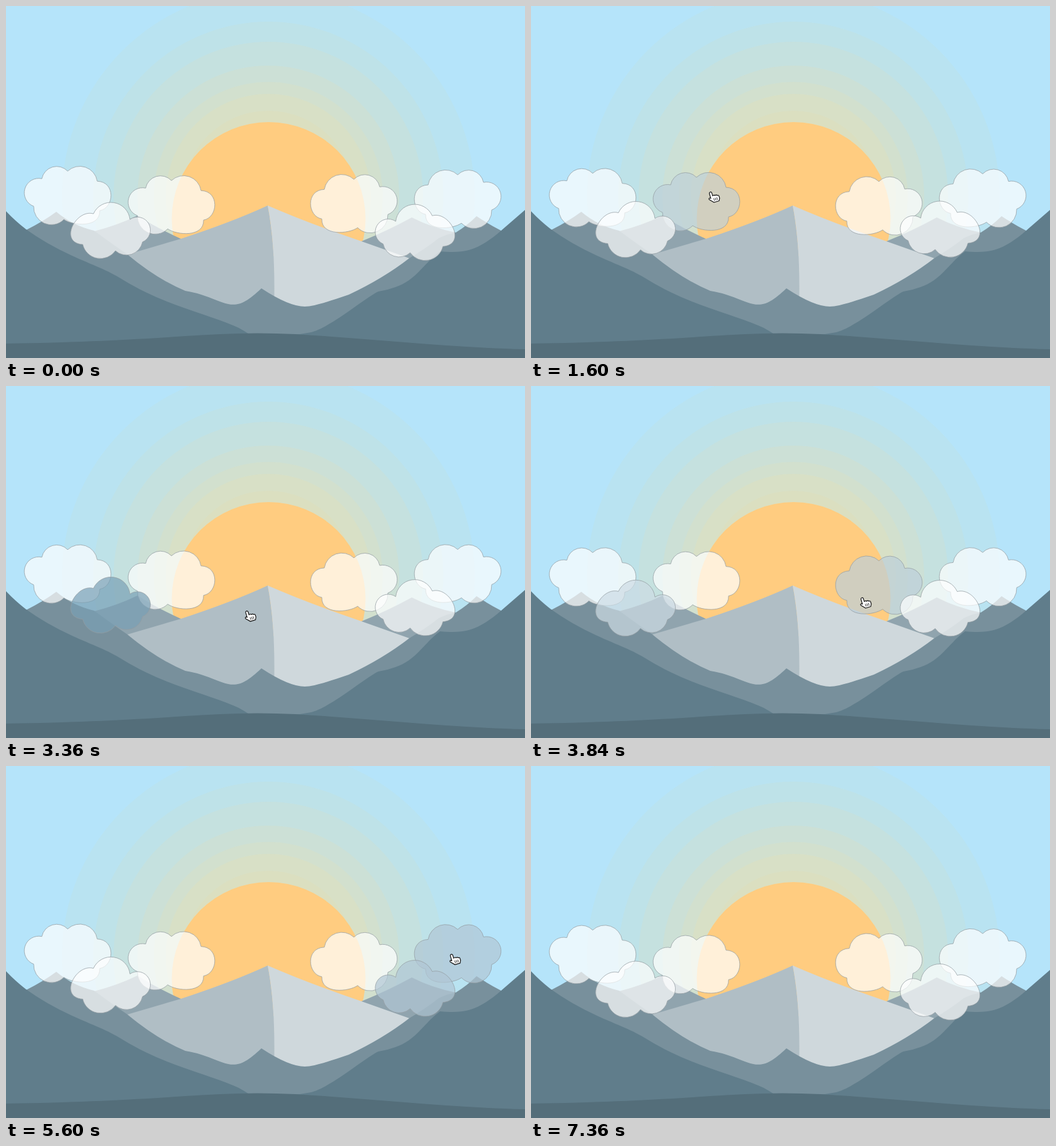
These frames come from a looping animation (825x561 px, 7.52 s). An HTML page:

```html
<!DOCTYPE html>
<html lang="en">
<head>
<meta charset="utf-8">
<title>Sunrise with clouds</title>
<style>
html, body { margin: 0; width: 100%; height: 100%; overflow: hidden; background: #b5e4fa; }
svg { display: block; }
.cloud { fill-opacity: .7; stroke: #949da2; stroke-opacity: .85; stroke-width: .9; }
</style>
</head>
<body>
<svg width="825" height="561" viewBox="0 0 825 561">
  <rect width="825" height="561" fill="#b5e4fa"/>
  <!-- stepped glow -->
  <circle cx="417" cy="303" r="328" fill="#b9e3f1"/>
  <circle cx="417" cy="303" r="278" fill="#bee2e8"/>
  <circle cx="417" cy="303" r="246" fill="#c5e1df"/>
  <circle cx="417" cy="303" r="208" fill="#cce0d6"/>
  <circle cx="417" cy="303" r="182" fill="#d2e0ce"/>
  <circle cx="417" cy="303" r="163" fill="#d8e0c6"/>
  <circle cx="417" cy="303" r="136" fill="#dbdfc0"/>
  <circle cx="417.5" cy="339" r="154" fill="#ffcc80"/>
  <!-- far range -->
  <path fill="#90a4ae" d="M140 359Q176 350 209 334Q240 354 278 371L416 400L565 375Q607 358 645 337Q676 353 715 361L641 420H193Z"/>
  <!-- main peak -->
  <path fill="#b0bec5" d="M416 318Q360 344 278 371L193 396V480H428Q428 380 416 318Z"/>
  <path fill="#cfd8dc" d="M416 318Q480 346 565 375L641 402V485H426Q429 385 416 318Z"/>
  <!-- middle range -->
  <path fill="#78909c" d="M32 357Q58 344 80 328Q106 350 140 358Q164 376 193 396Q241 436 285 454Q300 456 322 464C360 479 369 485 406 450Q450 479 475 479C490 479 512 471 545 460Q600 434 641 402Q665 388 688 370Q700 364 715 361Q733 350 748 335Q766 347 787 358V540H32Z"/>
  <!-- near slopes -->
  <path fill="#607d8b" d="M0 327Q15 343 32 356Q64 379 103 397C142 415 158 419 187 437C254 478 320 490 370 513Q379 518 385 522V561H0Z"/>
  <path fill="#607d8b" d="M825 325L787 358C748 392 726 394 690 391C664 410 652 437 619 448Q606 453 592 455C575 462 515 513 485 520Q470 523 455 524V561H825Z"/>
  <path fill="#546e7a" d="M0 538C190 535 270 526 340 523Q400 520 460 523C590 531 700 544 825 547V561H0Z"/>
  <g id="clouds"></g>
  <g id="hand" stroke="#111" stroke-linejoin="round" stroke-linecap="round">
    <g transform="rotate(-17)">
      <path fill="#fff" stroke-width="1.2" d="M-2 1.5Q-1.8-.5 0-.5Q2-.5 2 1.5V6.5Q5 5 5.5 7Q8.5 6 9 8Q11.5 7.5 11.5 10V13L9.5 17H1L-5 10.5Q-5.5 8-3 8.5L-2 9.5Z"/>
      <path fill="none" stroke-width=".8" d="M2.5 11v3.5M5 11v3.5M7.5 11v3.5"/>
    </g>
  </g>
</svg>
<script>
const LOOP = 7520, STEP = 160, BOB = 2400, FADE = 900;
const BIG = 'M29 19A23 23 0 0 0 16 63A28 28 0 0 0 64 84C78 94 122 98 121 70C144 66 147 24 117 23A28 28 0 0 0 70 7A24 24 0 0 0 29 19Z';
const SMALL = 'M36 18C8 10 -20 64 19 67A29 29 0 0 0 71 77A26 26 0 0 0 114 63A20.7 20.7 0 1 0 94 27A30.4 30.4 0 0 0 36 18Z';

// a and b: cosine and sine parts of the bobbing; over: time span of the pointer on the cloud
const clouds = [
  { d: BIG, x: 28, y: 256.2, a: 0, b: -4 },
  { d: BIG, x: 193, y: 267.3, a: 3.9, b: -.8, over: [1230, 2280] },
  { d: BIG, x: 623, y: 269.3, a: 0, b: -4, flip: true, over: [3460, 4240] },
  { d: BIG, x: 788, y: 258.7, a: 3.4, b: -4.1, flip: true, over: [5150, 6420] },
  { d: SMALL, x: 103, y: 309.7, a: 3.4, b: -4.1, over: [2280, 3220] },
  { d: SMALL, x: 713.5, y: 312.3, a: 3.9, b: -.8, flip: true, over: [4180, 5150] }
];

// pointer path: time, x, y
const path = [
  [480, 300, 9], [1120, 294, 209], [1280, 290, 270], [1600, 285, 297],
  [2280, 222, 345], [2720, 173, 358], [3220, 232, 372], [3460, 490, 350],
  [3840, 526, 338], [4220, 605, 345], [4800, 661, 356], [5150, 690, 330],
  [5500, 712, 305], [6240, 681, 273], [6420, 684, 250], [6720, 690, 33], [6880, 690, 0]
];

const hand = document.getElementById('hand');
const group = document.getElementById('clouds');
for (const c of clouds) {
  c.el = document.createElementNS('http://www.w3.org/2000/svg', 'path');
  c.el.setAttribute('d', c.d);
  c.el.setAttribute('class', 'cloud');
  group.append(c.el);
}

const clamp = v => Math.max(0, Math.min(1, v));
const mix = (a, b, k) => a + (b - a) * k;

function shade(t, over) {
  if (!over) return 0;
  const [enter, leave] = over;
  const peak = clamp((Math.min(t, leave) - enter) / FADE);
  return clamp(peak - Math.max(0, t - leave) / FADE);
}

function drawHand(t) {
  const i = path.findIndex((p, n) => n && t <= p[0]);
  const shown = i > 0 && t >= path[0][0];
  hand.setAttribute('visibility', shown ? 'visible' : 'hidden');
  if (!shown) return;
  const [t0, x0, y0] = path[i - 1], [t1, x1, y1] = path[i];
  const k = (t - t0) / (t1 - t0);
  hand.setAttribute('transform', `translate(${mix(x0, x1, k)} ${mix(y0, y1, k)})`);
}

function draw(now) {
  const t = Math.floor(now % LOOP / STEP) * STEP;
  const angle = t / BOB * 2 * Math.PI;
  for (const c of clouds) {
    const y = c.y + c.a * Math.cos(angle) + c.b * Math.sin(angle);
    const k = shade(t, c.over);
    c.el.setAttribute('transform', `translate(${c.x} ${y})${c.flip ? ' scale(-1 1)' : ''}`);
    c.el.setAttribute('fill', `rgb(${[98, 142, 168].map(v => Math.round(mix(255, v, k)))})`);
  }
  drawHand(t);
}

let start;
function frame(now) {
  start ??= now;
  draw(now - start);
  requestAnimationFrame(frame);
}
draw(0);
requestAnimationFrame(frame);
</script>
</body>
</html>
```
